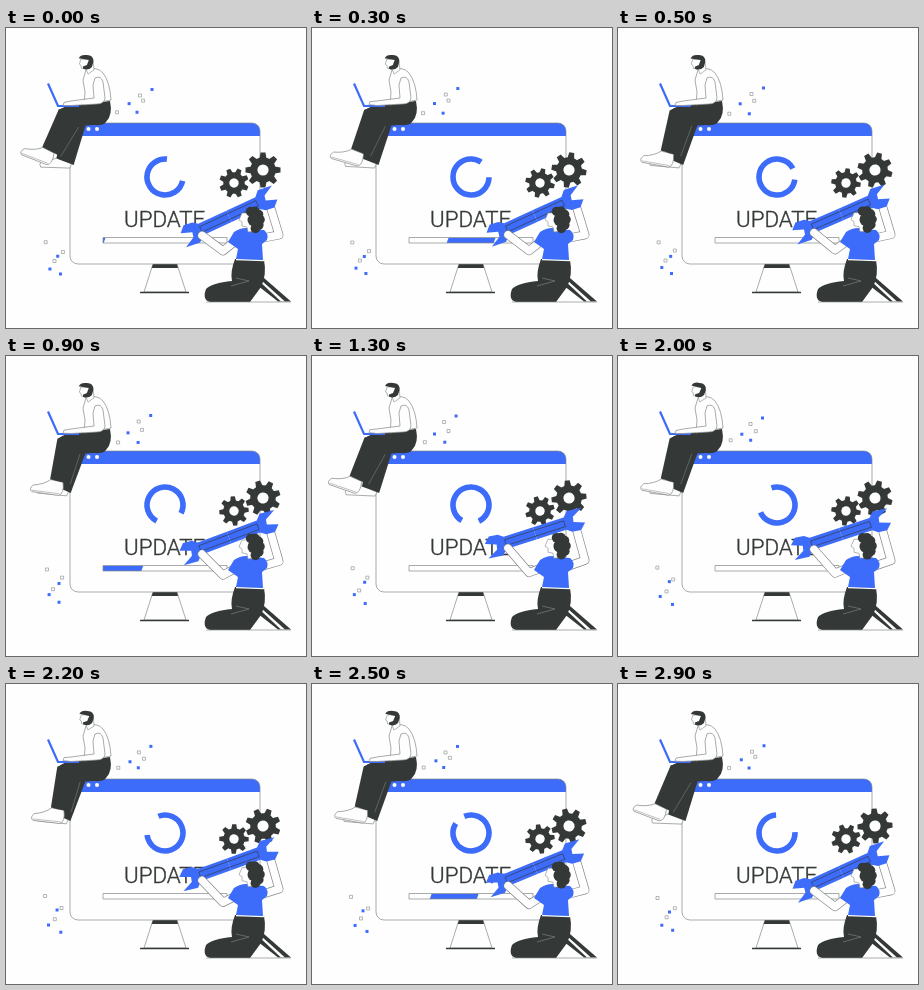
Animation, 300 px wide and 300 px high, one loop 3 s. Source, as an HTML page with a canvas:

```html
<!DOCTYPE html>
<html lang="en">
<head>
<meta charset="utf-8">
<title>Update</title>
<style>
  html, body { margin: 0; width: 100%; height: 100%; overflow: hidden; background: #fefefe; }
  canvas { display: block; width: 300px; height: 300px; }
</style>
</head>
<body>
<canvas></canvas>
<script>
const BLUE = '#3d6cfb', DARK = '#343938', LINE = '#858988', WHITE = '#fefefe';
const LOOP = 3000, TAU = Math.PI * 2, RAD = Math.PI / 180;
const canvas = document.querySelector('canvas');
const ctx = canvas.getContext('2d');
const ratio = window.devicePixelRatio || 1;
canvas.width = canvas.height = 300 * ratio;

function shape(d, fill, stroke = LINE, width = 0.7) {
  const path = new Path2D(d);
  if (fill) { ctx.fillStyle = fill; ctx.fill(path); }
  if (stroke) { ctx.strokeStyle = stroke; ctx.lineWidth = width; ctx.stroke(path); }
}

function disc(x, y, r, fill) {
  ctx.fillStyle = fill;
  ctx.beginPath();
  ctx.arc(x, y, r, 0, TAU);
  ctx.fill();
}

// Draws with the origin at (x, y), turned clockwise.
function placed(x, y, degrees, draw) {
  ctx.save();
  ctx.translate(x, y);
  ctx.rotate(degrees * RAD);
  draw();
  ctx.restore();
}

// Turns a drawing made in stage coordinates about a pivot.
function turned(x, y, degrees, draw) {
  placed(x, y, degrees, () => { ctx.translate(-x, -y); draw(); });
}

const wave = (t, period = LOOP) => Math.cos(TAU * t / period);

function monitor() {
  const outline = new Path2D();
  outline.roundRect(64, 95, 190, 141, 8);
  shape('M147 236H171L180 264H138Z', WHITE);
  shape('M147 236H171L172 240H145.7Z', DARK, null);
  shape('M134 264.5H183', null, DARK, 1.6);
  ctx.save();
  ctx.clip(outline);
  shape('M64 95H254V236H64Z', WHITE, null);
  shape('M64 95H254V108H64Z', BLUE, null);
  ctx.restore();
  shape(outline, null);
  [0, 1, 2].forEach(i => disc(74 + i * 8.5, 101, 2, WHITE));
}

// The gap of the ring travels once round per loop and opens and closes once a second.
function spinner(t) {
  const middle = 37 + t * 360 / LOOP + 18 * wave(t + 50, 1000);
  const half = 33 + 15 * wave(t, 1000);
  ctx.strokeStyle = BLUE;
  ctx.lineWidth = 5.6;
  ctx.beginPath();
  ctx.arc(159, 149, 18, (middle + half - 90) * RAD, (middle - half + 270) * RAD);
  ctx.stroke();
}

function progress(t) {
  const run = (t + 10) % 750;
  const front = 97 + run * 0.24 + run ** 3 * 4e-7;
  const bar = 'M97 209.5H221V215H97Z';
  ctx.save();
  ctx.clip(new Path2D(bar));
  shape(`M${front} 209.5h-47l-2 5.5h47Z`, BLUE, null);
  ctx.restore();
  shape(bar, null);
}

function label() {
  ctx.fillStyle = ctx.strokeStyle = DARK;
  ctx.lineWidth = 0.4;
  ctx.font = '300 22.3px Roboto, sans-serif';
  ctx.fillText('UPDATE', 118, 198.5);
  ctx.strokeText('UPDATE', 118, 198.5);
}

function gear(x, y, r, degrees) {
  placed(x, y, degrees, () => {
    disc(0, 0, r * 0.73, DARK);
    for (let i = 0; i < 8; i++) {
      ctx.rotate(TAU / 8);
      shape(`M${-r * 0.2} ${-r * 0.65}L${-r * 0.14} ${-r}H${r * 0.14}L${r * 0.2} ${-r * 0.65}Z`, DARK, null);
    }
    disc(0, 0, r * 0.32, WHITE);
  });
}

const HOLLOW = [[133, 67], [137, 74], [112, 85], [40, 213], [56, 223], [48, 234]];
const SOLID = [[145, 61], [123, 77], [132, 85], [52, 227], [43, 240], [54, 247]];

function squares(points, t, fill, stroke) {
  points.forEach(([x, y], i) => {
    const drift = t + i * 700;
    shape(`M${x - 1.5 + wave(drift)} ${y - 1.5 + 1.5 * wave(drift + 600)}h3v3h-3Z`, fill, stroke, 0.6);
  });
}

function man(t) {
  const swing = wave(t, 1500);
  turned(66, 90, -2 * swing, () => {
    shape('M50 129Q44 132 34 132 31 135 33 138L62 140 65 133Z', WHITE);
    shape('M58 90H82L66 137 49 130Z', DARK, null);
  });
  turned(58, 88, 7.5 * swing, () => {
    shape('M41 122Q34 126 23 125.5 18 129 21 132L47 138.5Q53 138 53 126Z', WHITE);
    shape('M21 130.5L48 137', null, LINE, 0.5);
    shape('M52 82Q60 78 72 84L74 96 60 128.5 40.5 121.5Z', DARK, null);
    shape('M74 97L60 128.5', null, LINE, 0.5);
  });
  shape('M52 83Q58 77 70 77L104 73Q107 87 100 94 97 98 88 97L72 98 60 96Z', DARK, null);

  shape('M80 42Q91 38 97 45 104 54 105 72L78 77 79 64 77 52Z', WHITE);
  turned(84, 42, 2 * wave(t - 2000), () => {
    shape('M75 31L73.5 36 75 37 75.5 40 80 41 82 46 88 42 87 31Z', WHITE, LINE, 0.6);
    shape('M73 30Q75 26 81 27 88 27 87.5 34L86 39Q82 43 77 40.5L77 38.5 81 37 83 32Z', DARK, null);
  });
  shape('M42 55.5L52 78H73', null, BLUE, 2.2);
  const typing = 0.5 * wave(t, 500);
  shape(`M89 50Q95 47 97 54L99 70Q98 76 91 76L65 77.5 57 ${77 + typing} 58 ${74 + typing} 65 73 88 70 87 57Z`, WHITE);
}

function wrench(x, y, degrees) {
  placed(x, y, degrees, () => {
    for (let end = 0; end < 2; end++) {
      shape('M0 -6.3H32L37 -11.5 52 -10 41 -4 40 1 51 5 45 11 36 10 31 6.3H0Z', BLUE, null);
      ctx.rotate(Math.PI);
    }
    shape('M-31 -3H31V3H-31Z', null, DARK, 0.6);
  });
}

function limb(points, width) {
  ctx.save();
  ctx.lineJoin = ctx.lineCap = 'round';
  shape('M' + points, null, LINE, width + 1.4);
  shape('M' + points, null, WHITE, width);
  ctx.restore();
}

function woman(t) {
  const low = (1 + wave(t - 100)) / 2, lift = 1 - low;
  const angle = -17 - 8 * low, y = 176 + 12.5 * low;
  const slope = Math.tan(angle * RAD);

  limb([257, 210, 273, 207 - lift * 3, 265, y + 40 * slope + 11], 7.5);
  wrench(223, y, angle);
  limb([232, 211, 217, 223 - lift * 7, 196, y - 28 * slope + 6], 7.5);

  shape('M247 254L258 250 285 273.5H272Z', DARK, null);
  shape('M252 252H255L279 273.5H275Z', WHITE, null);
  shape('M229 231L258 232Q261 247 255 259L244 274H204Q196 272 200 261 206 255 226 253 224 244 229 231Z', DARK, null);
  shape('M230 250L243 253 225 258', null, LINE, 0.6);
  shape('M200 274H285', null);
  shape('M230 231.5L258 232.5', null, WHITE, 1.5);
  shape('M228 204Q237 198 246 201L258 202Q263 206 261 212L256 216 257 232 230 231 232 221 222 214Z', BLUE, null);

  placed(1, 1 - 2 * lift, 0, () => {
    shape('M235 184L232 191 235 193 235 197 240 198 241 203 250 202 249 184Z', WHITE, LINE, 0.6);
    for (let i = 0; i < 6; i++) {
      const turn = (i * 36 - 110) * RAD;
      disc(246 + 7 * Math.cos(turn), 191 + 9 * Math.sin(turn), 4.8, DARK);
    }
    disc(247, 191, 6.5, DARK);
  });
}

function render(t) {
  ctx.setTransform(ratio, 0, 0, ratio, 0, 0);
  ctx.fillStyle = WHITE;
  ctx.fillRect(0, 0, 300, 300);
  monitor();
  spinner(t);
  label();
  progress(t);
  gear(257, 142, 17.5, t * 90 / LOOP);
  gear(228, 155, 14.7, 22 - t * 90 / LOOP);
  squares(HOLLOW, t, WHITE, LINE);
  squares(SOLID, t, BLUE, null);
  man(t);
  woman(t);
}

const start = performance.now();
function tick() {
  render((performance.now() - start) % LOOP);
  requestAnimationFrame(tick);
}
tick();
</script>
</body>
</html>
```
